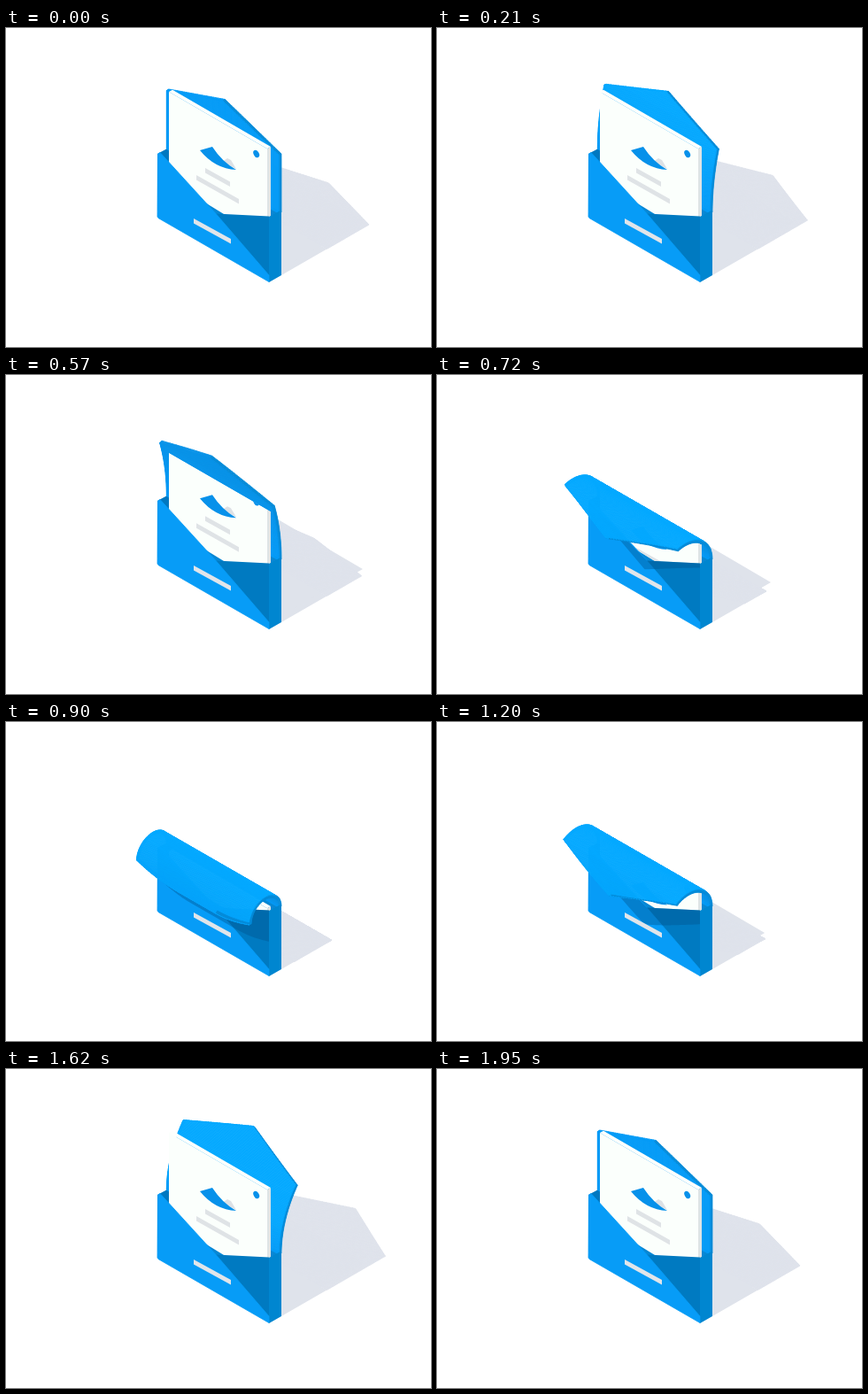
Animation, 480 px wide and 360 px high, one loop 1.98 s. Source, as an HTML page with a canvas:

```html
<!DOCTYPE html>
<html lang="en">
<head>
<meta charset="utf-8">
<title>Envelope</title>
<style>
html, body { margin: 0; width: 100%; height: 100%; overflow: hidden; background: #fff; }
canvas { display: block; width: 480px; height: 360px; }
</style>
</head>
<body>
<canvas id="stage" width="480" height="360"></canvas>
<script>
const ctx = document.getElementById('stage').getContext('2d');
const STEP = 30, COUNT = 66;
const SIDE = 66, LENGTH = 91, THICK = 3;   // flap: straight edge, full length, thickness
const FLOOR = 71, SLANT = 0.834;           // hinge height and shadow reach per unit of height
const FRONT = 15, CARD = 7;                // depths in front of the hinge
const SHADOW = '#dfe3eb', EDGE = '#058bd9';

// u runs along the hinge, d towards the viewer, h upwards
const iso = (u, d, h) => [184 + 127 * u - 0.866 * d, 135 + 73 * u + 0.5 * d - h];
const ground = (u, d, h) => iso(u, d - (h + FLOOR) * SLANT, -FLOOR);
const onFront = (u, d, h) => iso(u, FRONT, h - (d - FRONT) / SLANT);
const mix = (a, b, t) => {
  t = Math.max(0, Math.min(1, t));
  return `rgb(${a.map((v, i) => Math.round(v + (b[i] - v) * t))})`;
};

function trace(pts) {
  ctx.beginPath();
  pts.forEach(p => ctx.lineTo(p[0], p[1]));
  ctx.closePath();
}

function poly(pts, color, line = 0) {
  trace(pts);
  ctx.fillStyle = color;
  ctx.fill();
  if (line) {
    ctx.strokeStyle = color;
    ctx.lineWidth = line;
    ctx.lineJoin = 'round';
    ctx.stroke();
  }
}

// curvature of the flap: lean back, then roll over the front
function bendAt(x) {
  const low = -0.0107, turn = 14.5;
  if (x < turn) return low * Math.pow(Math.sin(Math.PI / 2 * x / turn), 2.8);
  const q = (x - turn) / (32.5 - turn);
  return low + 0.0603 * Math.pow(Math.sin(Math.PI / 2 * q), 1.457);
}

function dropAt(x) {
  const q = Math.max(0, Math.min(1, (x - 18) / 12));
  return 74 * (1 - Math.cos(Math.PI * q)) / 2;
}

function makeFlap(bend) {
  const k = Math.abs(bend) < 1e-5 ? 1e-5 : bend;
  const stretch = k < 0 ? 1 - 8.2 * k : 1;
  const rows = [];
  for (let s = 0; s <= LENGTH; s++) {
    const a = k * s * stretch, inset = Math.max(0, s - SIDE) / (LENGTH - SIDE) / 2;
    const d = (1 - Math.cos(a)) / k, h = Math.sin(a) / k;
    rows.push({ a, d, h, u0: inset, u1: 1 - inset,
      di: d + THICK * Math.cos(a), hi: h - THICK * Math.sin(a) });
  }
  return rows.slice(1).map((b, i) => ({ a: rows[i], b, angle: (rows[i].a + b.a) / 2 }));
}

const quad = (s, place) => [
  place(s.a.u0, s.a.d, s.a.h), place(s.a.u1, s.a.d, s.a.h),
  place(s.b.u1, s.b.d, s.b.h), place(s.b.u0, s.b.d, s.b.h)];

const innerQuad = s => [
  iso(s.a.u0, s.a.di, s.a.hi), iso(s.a.u1, s.a.di, s.a.hi),
  iso(s.b.u1, s.b.di, s.b.hi), iso(s.b.u0, s.b.di, s.b.hi)];

const rim = (s, key) => [
  iso(s.a[key], s.a.d, s.a.h), iso(s.b[key], s.b.d, s.b.h),
  iso(s.b[key], s.b.di, s.b.hi), iso(s.a[key], s.a.di, s.a.hi)];

const rank = t => t < Math.PI / 4 ? 0 : t > Math.PI * 1.25 ? 1 : 2;

function faceColor(t) {
  const r = rank(t);
  if (r === 1) return '#0078be';
  if (r === 2) return mix([5, 169, 255], [4, 163, 250], (t - 2) / 1.6);
  return t < 0 ? mix([5, 155, 247], [4, 169, 255], -t / 0.3)
               : mix([5, 155, 247], [8, 146, 232], t / 0.3);
}

function drawFlap(strips) {
  const sorted = strips.slice().sort((p, q) => rank(p.angle) - rank(q.angle));
  for (const s of sorted) {
    const color = faceColor(s.angle);
    poly(rim(s, 'u0'), color, 0.8);
    poly(rim(s, 'u1'), EDGE, 0.8);
    poly(rank(s.angle) === 2 ? quad(s, iso) : innerQuad(s), color, 0.8);
  }
}

function drawShadow(flap, drop) {
  const out = (x, y, h) => [x + 0.866 * SLANT * h, y - 0.5 * SLANT * h];
  const tall = 145 - drop;
  poly([iso(0, 0, -FLOOR), iso(1, 0, -FLOOR), ground(1, 0, 0), ground(0, 0, 0)], SHADOW);
  poly([[188, 214], [299, 279], out(299, 279, tall), out(188, 214, tall)], SHADOW);
  flap.forEach(s => poly(quad(s, ground), SHADOW, 0.8));
}

function drawCard(drop, bend) {
  ctx.save();
  if (bend > 0) {
    const a = Math.acos(1 - CARD * bend), y = 145 - Math.sin(a) / bend;
    trace([[170, y - 8], [312, y + 74], [312, 300], [170, 300]]);
    ctx.clip();
  }
  const top = 72 + drop;
  poly([[184, top], [188, top - 2.3], [299, top + 62], [295, top + 64.3]], '#fdfffd');
  poly([[295, top + 64.3], [299, top + 62], [299, 216], [295, 216]], '#dfe4e5');
  const face = [[184, top], [295, top + 64.3], [295, 240], [184, 172]];
  poly(face, '#fbfffc');
  trace(face);
  ctx.clip();
  ctx.translate(0, drop);

  poly([[244, 151], [250, 147], [254, 149], [260, 159]], '#dde1e5');
  ctx.fillStyle = '#0791ea';
  ctx.beginPath();
  ctx.moveTo(219, 138);
  ctx.lineTo(233, 134);
  ctx.quadraticCurveTo(244, 151, 260, 160);
  ctx.quadraticCurveTo(236, 159, 219, 138);
  ctx.fill();
  ctx.beginPath();
  ctx.ellipse(282.7, 142, 3, 4.5, -0.5, 0, Math.PI * 2);
  ctx.fill();
  poly([[225, 158], [253, 173.5], [253, 179], [225, 163.5]], '#dfe3e6');
  poly([[215, 166], [263, 193], [263, 198.5], [215, 171.5]], '#dfe3e6');
  ctx.restore();
}

function drawPocket(flap) {
  poly([[297, 213], [311, 205.5], [311, 279], [297, 287]], '#0086d0');
  poly([[237, 209.5], [297, 212.5], [297, 286], [240, 220]], '#007ac1');
  poly([[171.5, 142], [174, 140.5], [237, 209.5], [297, 279], [297, 286.5],
    [172, 214.5], [171, 213]], '#079cf7', 0.8);

  const cast = flap.filter(s => s.a.d > FRONT);
  if (cast.length) {
    ctx.save();
    trace([[171, 142], [237, 209.5], [297, 212.5], [297, 287], [171, 214.5]]);
    ctx.clip();
    ctx.beginPath();
    for (const s of cast) {
      // same winding for every piece keeps the union solid
      const q = quad(s, onFront);
      const turn = (q[1][0] - q[0][0]) * (q[3][1] - q[0][1]) - (q[1][1] - q[0][1]) * (q[3][0] - q[0][0]);
      if (turn < 0) q.reverse();
      q.forEach((p, i) => i ? ctx.lineTo(p[0], p[1]) : ctx.moveTo(p[0], p[1]));
      ctx.closePath();
    }
    ctx.fillStyle = 'rgba(0, 84, 140, 0.4)';
    ctx.fill();
    ctx.restore();
  }
  poly([[212, 215], [254, 238], [254, 243.5], [212, 220.5]], '#e1e5ea');
}

function draw(x) {
  const bend = bendAt(x), drop = dropAt(x), flap = makeFlap(bend);
  const ahead = s => s.a.d > CARD;
  ctx.fillStyle = '#fff';
  ctx.fillRect(0, 0, 480, 360);
  drawShadow(flap, drop);
  poly([iso(0, 0, 0), iso(1, 0, 0), iso(1, 0, -FLOOR), iso(0, 0, -FLOOR)], '#0787d4');
  poly([[171, 142], [184, 135], [184, 200], [171, 206]], '#0078c0');
  drawFlap(flap.filter(s => !ahead(s)));
  drawCard(drop, bend);
  drawPocket(flap);
  drawFlap(flap.filter(ahead));
}

const start = performance.now();
function tick() {
  const i = Math.floor((performance.now() - start) / STEP) % COUNT;
  draw(Math.min(i, COUNT - 1 - i));
  requestAnimationFrame(tick);
}
tick();
</script>
</body>
</html>
```
